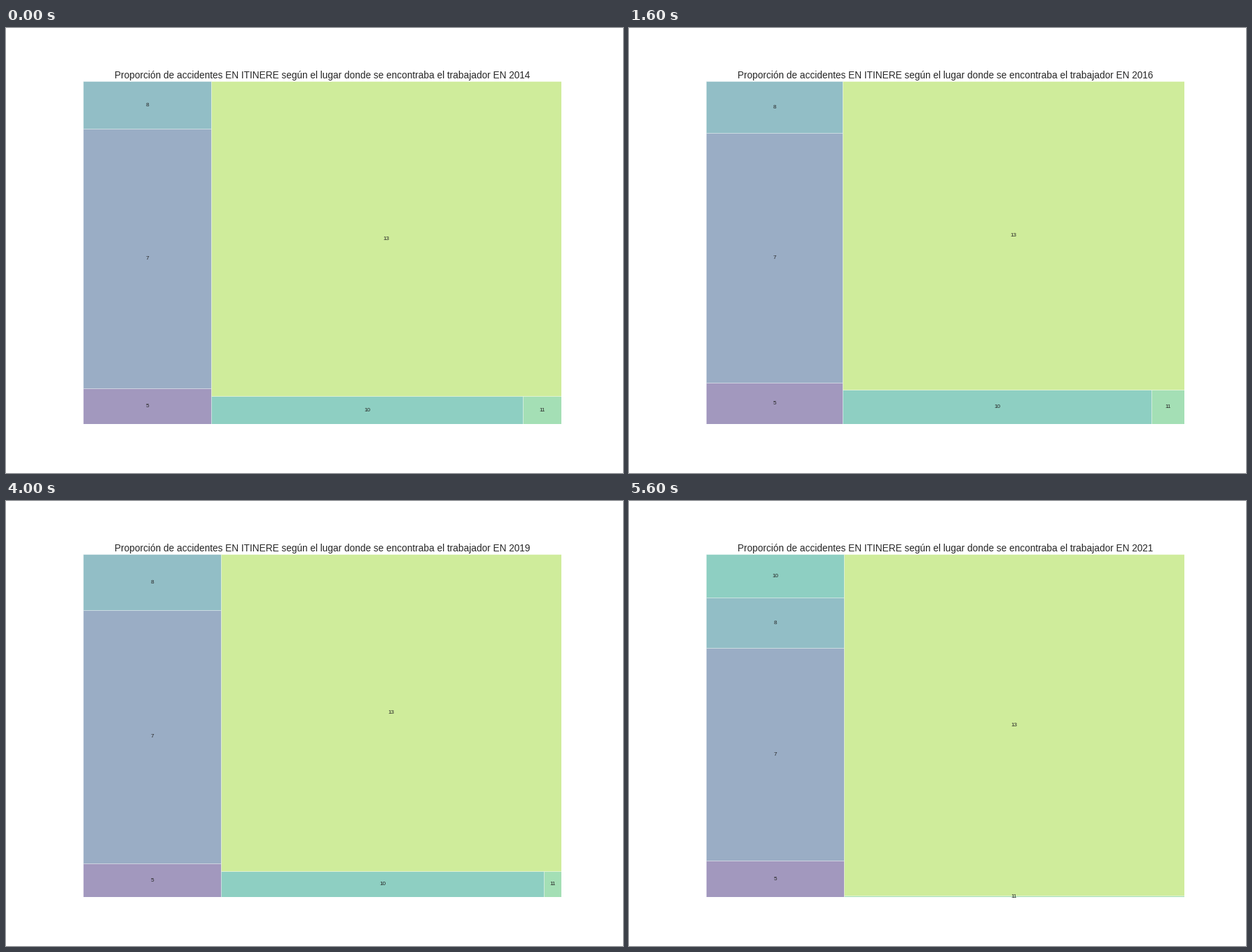
Animation, 881 px wide and 636 px high, one loop 6400 ms. Source, as a matplotlib script:

```python
import matplotlib.pyplot as plt
import numpy as np
from matplotlib.animation import FuncAnimation
from matplotlib.patches import Rectangle

W, H, DPI = 881, 636, 64
PT = W / 18 / DPI  # scale of one point on an 18 inch wide figure
LEFT, RIGHT = 0.125 * W, 0.9 * W
TOP, BOTTOM = 0.12 * H, 0.89 * H
INK = "0.15"
TITLE = ("Proporción de accidentes EN ITINERE según el lugar "
         "donde se encontraba el trabajador EN {}")

PLACES = (5, 7, 8, 10, 11, 13)
COLORS = plt.get_cmap("viridis")(np.linspace(0, 1, len(PLACES) + 2)[1:-1])

# column edge, bottom of 8, top of 5, bottom of 13, edge between 10 and 11
SPLITS = {
    2014: (293, 144, 515, 526, 738),
    2015: (299, 147, 511, 522, 742),
    2016: (305, 150, 507, 517, 746),
    2017: (311, 151, 513, 530, 709),
    2018: (309, 154, 516, 529, 739),
    2019: (307, 156, 518, 529, 768),
    2020: (289, 167, 514, 537, 769),
    2021: (307, 210, 514, 564.4, LEFT),
}
YEARS = list(SPLITS)
TOP_OF_8 = {2021: 138}  # here place 10 sits above place 8


def layout(year):
    """Boxes as (x0, y0, x1, y1), one for each place."""
    col, end8, top5, end13, split = SPLITS[year]
    top8 = TOP_OF_8.get(year, TOP)
    if top8 > TOP:
        box10 = (LEFT, TOP, col, top8)
        box11 = (col, end13, RIGHT, BOTTOM)
    else:
        box10 = (col, end13, split, BOTTOM)
        box11 = (split, end13, RIGHT, BOTTOM)
    return (
        (LEFT, top5, col, BOTTOM),
        (LEFT, end8, col, top5),
        (LEFT, top8, col, end8),
        box10,
        box11,
        (col, TOP, RIGHT, end13),
    )


plt.rcParams["font.family"] = "Liberation Sans"
fig = plt.figure(figsize=(W / DPI, H / DPI), dpi=DPI, facecolor="white")
ax = fig.add_axes([0.125, 0.11, 0.775, 0.77])
ax.set_xlim(LEFT, RIGHT)
ax.set_ylim(BOTTOM, TOP)
ax.axis("off")
title = ax.set_title("", fontsize=20 * PT, pad=6 * PT, color=INK)

tiles, labels = [], []
for place, color in zip(PLACES, COLORS):
    tile = Rectangle((0, 0), 1, 1, facecolor=color, edgecolor="white",
                     linewidth=PT, alpha=0.5)
    tiles.append(ax.add_patch(tile))
    labels.append(ax.text(0, 0, str(place), ha="center", va="center",
                          fontsize=12 * PT, color=INK))


def draw(i):
    year = YEARS[i % len(YEARS)]
    title.set_text(TITLE.format(year))
    for tile, label, (x0, y0, x1, y1) in zip(tiles, labels, layout(year)):
        tile.set_bounds(x0, y0, x1 - x0, y1 - y0)
        label.set_position(((x0 + x1) / 2, (y0 + y1) / 2))
    return [title, *tiles, *labels]


anim = FuncAnimation(fig, draw, frames=len(YEARS), interval=800,
                     repeat=True, repeat_delay=0)
plt.show()
```
